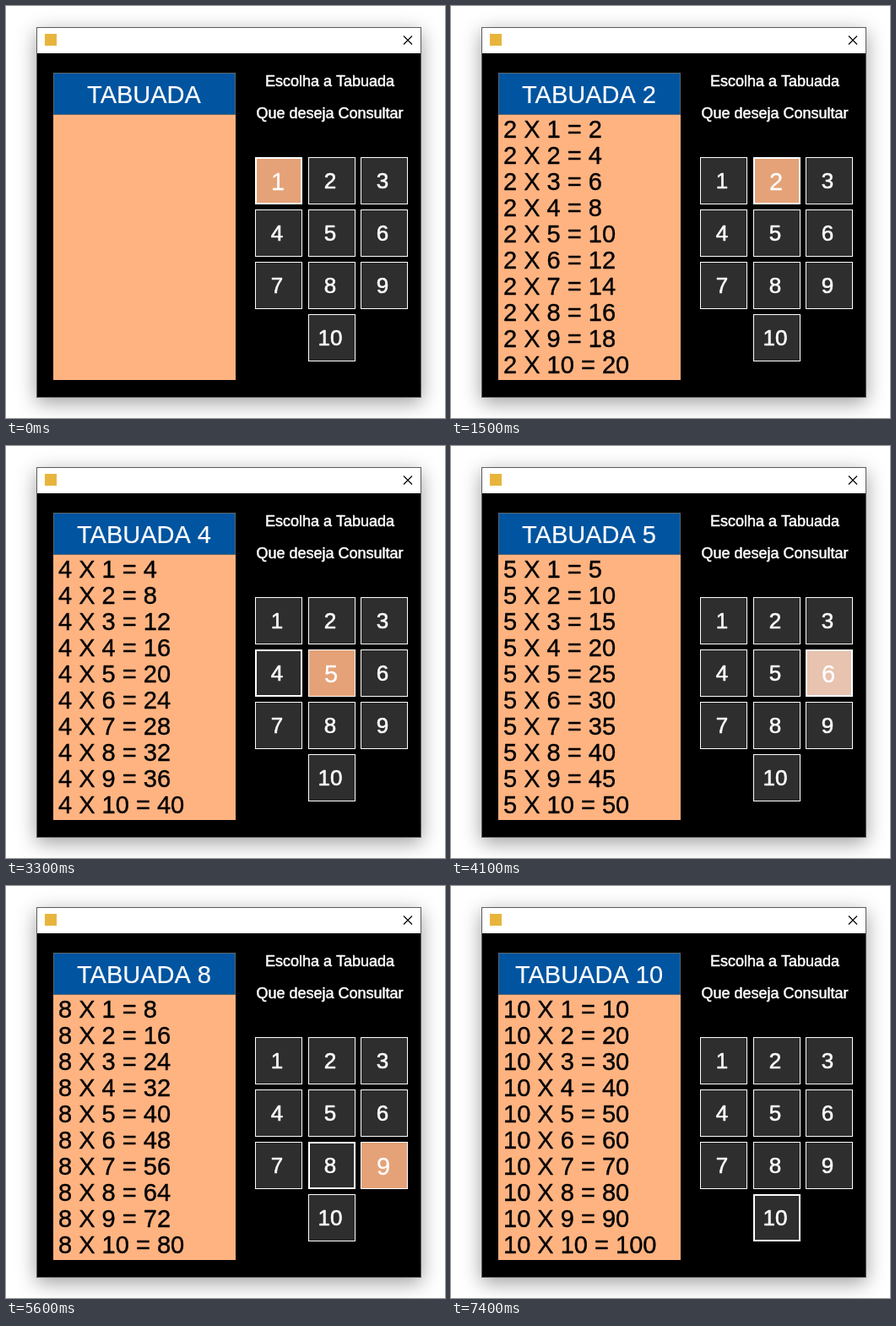
These frames come from a looping animation (520 px wide and 488 px high, 7.5 s). An HTML page with a canvas:

```html
<!DOCTYPE html>
<html lang="pt">
<head>
<meta charset="utf-8">
<title>Tabuada</title>
<style>
html, body { margin: 0; width: 100%; height: 100%; overflow: hidden; background: #fff; }
canvas { display: block; width: 520px; height: 488px; }
</style>
</head>
<body>
<canvas id="stage"></canvas>
<script>
const W = 520, H = 488, LOOP = 7500;
const FONT = '"Liberation Sans", Arial, sans-serif';
const canvas = document.getElementById('stage');
const ctx = canvas.getContext('2d');
const dpr = window.devicePixelRatio || 1;
canvas.width = W * dpr;
canvas.height = H * dpr;
ctx.scale(dpr, dpr);

// Pointer times for buttons 1 to 10, in ms
const enter = [0, 900, 1800, 2500, 3100, 3800, 4400, 5000, 5500, 6100];
const press = [400, 1100, 2000, 2700, 3500, 4100, 4700, 5200, 5800, 6400];
const HOLD = 100, LEAVE = 7400;

const COLS = [295, 358, 420];

function rect(color, x, y, w, h) {
  ctx.fillStyle = color;
  ctx.fillRect(x, y, w, h);
}

function text(str, x, y, size, color, align = 'center', weight = 0) {
  ctx.font = `${size}px ${FONT}`;
  ctx.textAlign = align;
  ctx.fillStyle = color;
  ctx.fillText(str, x, y);
  if (weight) {
    ctx.strokeStyle = color;
    ctx.lineWidth = weight;
    ctx.lineJoin = 'round';
    ctx.strokeText(str, x, y);
  }
}

// Number of entries already reached at time t
const countUntil = (times, t) => times.filter(v => v <= t).length;

function stateAt(t) {
  const focus = countUntil(press, t);
  return {
    table: countUntil(press, t - HOLD),
    focus: focus || 1,
    hover: t < LEAVE ? countUntil(enter, t) : 0,
    down: focus && t < press[focus - 1] + HOLD ? focus : 0
  };
}

function drawWindow() {
  rect('#fff', 0, 0, W, H);
  ctx.save();
  ctx.shadowColor = 'rgba(0,0,0,.38)';
  ctx.shadowBlur = 22 * dpr;
  ctx.shadowOffsetY = 6 * dpr;
  rect('#5c5c5c', 36, 25, 456, 439);
  ctx.restore();
  rect('#fff', 37, 26, 454, 30);
  rect('#000', 37, 56, 454, 407);
  rect('#e8b53c', 46, 33, 14, 14);

  ctx.strokeStyle = '#000';
  ctx.lineWidth = 1.1;
  ctx.beginPath();
  ctx.moveTo(471, 35.5);
  ctx.lineTo(481, 45.5);
  ctx.moveTo(481, 35.5);
  ctx.lineTo(471, 45.5);
  ctx.stroke();

  text('Escolha a Tabuada', 383.5, 95, 18, '#fff', 'center', 0.5);
  text('Que deseja Consultar', 383.5, 133, 18, '#fff', 'center', 0.5);
}

function drawTable(n) {
  rect('#56666f', 56, 79, 216, 50);
  rect('#0054a0', 57, 80, 214, 48);
  rect('#ffb380', 56, 129, 216, 314);
  text(n ? `TABUADA ${n}` : 'TABUADA', 163.5, 115, 29, '#fff', 'center', 0.2);
  if (!n) return;
  for (let i = 1; i <= 10; i++) {
    text(`${n} X ${i} = ${n * i}`, 62, 125 + 31 * i, 29, '#000', 'left', 0.4);
  }
}

function drawButton(n, s) {
  const x = n === 10 ? COLS[1] : COLS[(n - 1) % 3];
  const y = 179 + 62 * Math.floor((n - 1) / 3);
  const edge = n === s.focus ? 2 : 1;
  const hot = n === s.hover;
  const fill = n === s.down ? '#e7c3b0' : hot ? '#e5a278' : '#2e2e2e';
  rect('#fff', x, y, 56, 56);
  rect(fill, x + edge, y + edge, 56 - 2 * edge, 56 - 2 * edge);
  if (hot) text(n, x + 27, y + 38.5, 29, '#fff', 'center', 0.3);
  else text(n, x + 26, y + 37, 26, '#fff', 'center', 0.6);
}

function draw(t) {
  const s = stateAt(t);
  drawWindow();
  drawTable(s.table);
  for (let n = 1; n <= 10; n++) drawButton(n, s);
}

const start = performance.now();
function tick() {
  draw((performance.now() - start) % LOOP);
  requestAnimationFrame(tick);
}
tick();
</script>
</body>
</html>
```
